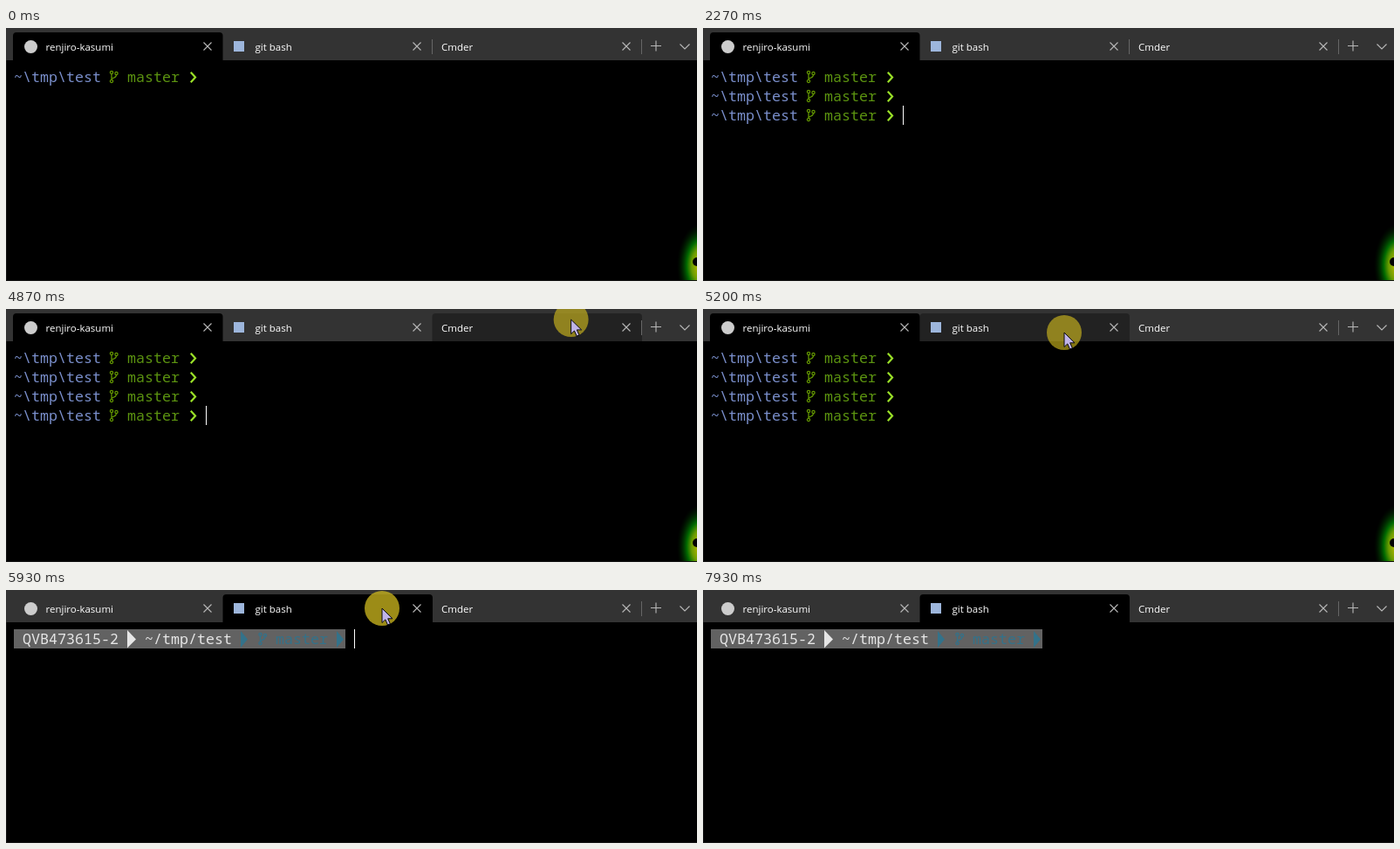
An HTML page for the animation above (8000 ms loop, 792x290 px).

```html
<!DOCTYPE html>
<html lang="en">
<head>
<meta charset="utf-8">
<title>Terminal tabs</title>
<style>
  html, body { margin: 0; width: 100%; height: 100%; overflow: hidden; background: #000; }
  svg { display: block; }
  .title { font: 11.5px "Open Sans", "Noto Sans", sans-serif; fill: #fff; }
  .mono { font: 16.667px "Noto Sans Mono", "DejaVu Sans Mono", monospace; }
  .line { fill: none; stroke: #b8b8b8; stroke-width: 1.1; }
  .divider { fill: #666; }
</style>
</head>
<body>
<svg width="792" height="290" viewBox="0 0 792 290">
  <defs>
    <radialGradient id="halo" gradientUnits="userSpaceOnUse" r="1"
        gradientTransform="translate(797 272) scale(28 48)" cx="0" cy="0">
      <stop offset=".2" stop-color="#a0b000"/>
      <stop offset=".4" stop-color="#6a9c00"/>
      <stop offset=".6" stop-color="#006a00"/>
      <stop offset="1" stop-color="#001c00" stop-opacity="0"/>
    </radialGradient>
    <path id="tab" d="M0 37V9q0-4 4-4H236.500q4 0 4 4V37z"/>
    <path id="close" class="line" d="M-4.500-4.500l9 9M4.500-4.500l-9 9"/>
    <g id="branch" fill="none" stroke-width="1.3">
      <circle cx="2.500" cy="-10" r="1.600"/>
      <circle cx="8" cy="-9" r="1.600"/>
      <circle cx="2.500" cy="0" r="1.600"/>
      <path d="M2.500-8.400V-1.600M8-7.400Q8-4 2.500-3"/>
    </g>
    <g id="prompt" class="mono">
      <text x="9" y="62" fill="#7a8fcc">~\tmp\test</text>
      <use href="#branch" x="118.500" y="61" stroke="#629500"/>
      <text x="139" y="62" fill="#5c9410">master</text>
      <path d="M211.800 50.800l5.200 5.700-5.200 5.700" fill="none" stroke="#9ae028" stroke-width="2.200"/>
    </g>
  </defs>

  <rect width="792" height="290" fill="#151515"/>
  <rect width="792" height="37" fill="#333"/>
  <rect x="1" y="37" width="791" height="252"/>
  <use id="hover" href="#tab" fill="#222"/>
  <use id="active" href="#tab"/>

  <circle cx="28.500" cy="21.500" r="7.500" fill="#ccc"/>
  <rect x="261" y="15" width="12" height="12" fill="#9db6dc"/>
  <g class="title">
    <text x="45.500" y="25.500">renjiro-kasumi</text>
    <text x="285.500" y="25.500">git bash</text>
    <text x="499" y="25.500">Cmder</text>
  </g>
  <use href="#close" x="231" y="21"/>
  <use href="#close" x="471" y="21"/>
  <use href="#close" x="711" y="21"/>
  <rect id="split" class="divider" x="488" y="13" width="1" height="17"/>
  <rect class="divider" x="728" y="13" width="1" height="17"/>
  <path class="line" d="M739 20.500h12M745 14.500v12M772.500 18.500l5.500 5.500 5.500-5.500"/>

  <g id="shell">
    <rect x="765" y="220" width="27" height="69" fill="url(#halo)"/>
    <circle cx="792" cy="268" r="5"/>
    <use href="#prompt"/>
    <g id="history"></g>
  </g>

  <g id="bash" class="mono">
    <rect x="9" y="45" width="380" height="22" fill="#626262"/>
    <g fill="#e6e6e6">
      <text x="19" y="62">QVB473615-2</text>
      <path d="M139 46l10 10.500-10 10z"/>
      <text x="159" y="62">~/tmp/test</text>
    </g>
    <g fill="#33728a">
      <path d="M269 47l8 9.500-8 9.500z"/>
      <use href="#branch" x="289" y="61" stroke="#33728a"/>
      <text x="309" y="62">master</text>
      <path d="M379 47l8 9.500-8 9.500z"/>
    </g>
  </g>

  <rect id="caret" width="1" height="22" fill="#fff"/>
  <g id="mouse">
    <circle id="spot" r="20" fill="#c8b41e"/>
    <path d="M0 0V16.500l3.800-3.600 2.700 6.100 2.900-1.300-2.700-5.900H12z" fill="#c0b4e8" stroke="#080810"/>
  </g>
</svg>
<script>
const LOOP = 8000, SWITCH = 5470, ROW = 22;
const $ = id => document.getElementById(id);
const show = (el, on) => { el.style.visibility = on ? "visible" : "hidden"; };
const put = (el, x, y) => el.setAttribute("transform", `translate(${x} ${y})`);

// Enter pressed, then the next prompt printed
const enters = [[1070, 1200], [2000, 2130], [3340, 3470]];
// Spans in which the caret is lit
const lit = [[470, 1000], [1070, 1670], [2000, 2730], [3270, 3870],
             [4400, 4900], [5400, 6340], [6870, 7400]];
// Mouse path: time, x, y
const path = [[4600, 768, -18], [4760, 712, 8], [5130, 414, 27], [5400, 414, 27],
              [5600, 431, 21], [5940, 431, 21], [6200, 580, -30]];

const prompts = enters.map((_, i) => {
  const line = document.createElementNS("http://www.w3.org/2000/svg", "use");
  line.setAttribute("href", "#prompt");
  line.setAttribute("y", ROW * (i + 1));
  return $("history").appendChild(line);
});

function mouseAt(t) {
  const i = path.findIndex(p => p[0] > t);
  if (i < 1) return null;
  const [a, b] = [path[i - 1], path[i]];
  const k = (t - a[0]) / (b[0] - a[0]), e = k * k * (3 - 2 * k);
  return [a[1] + (b[1] - a[1]) * e, a[2] + (b[2] - a[2]) * e];
}

function draw(t) {
  const bash = t >= SWITCH;
  show($("shell"), !bash);
  show($("bash"), bash);
  put($("active"), bash ? 248.5 : 8, 0);
  prompts.forEach((line, i) => show(line, !bash && t >= enters[i][1]));

  const row = enters.filter(e => t >= e[0]).length;
  const waiting = enters.some(([down, ready]) => t >= down && t < ready);
  show($("caret"), lit.some(([on, off]) => t >= on && t < off));
  put($("caret"), bash ? 399 : waiting ? 9 : 229, 45 + (bash ? 0 : row * ROW));

  const pos = mouseAt(t);
  show($("mouse"), pos);
  const [x, y] = pos || [0, -99];
  put($("mouse"), x, y);
  $("spot").setAttribute("opacity", bash ? .78 : .66);

  const overBash = !bash && x >= 249 && x < 489 && y > 5;
  const overLast = x >= 489 && x < 728 && y > 5;
  show($("hover"), overBash || overLast);
  put($("hover"), overBash ? 248.5 : 488.5, 0);
  show($("split"), !bash && !overBash && !overLast);
}

const start = performance.now();
(function frame() {
  draw((performance.now() - start) % LOOP);
  requestAnimationFrame(frame);
})();
</script>
</body>
</html>
```
